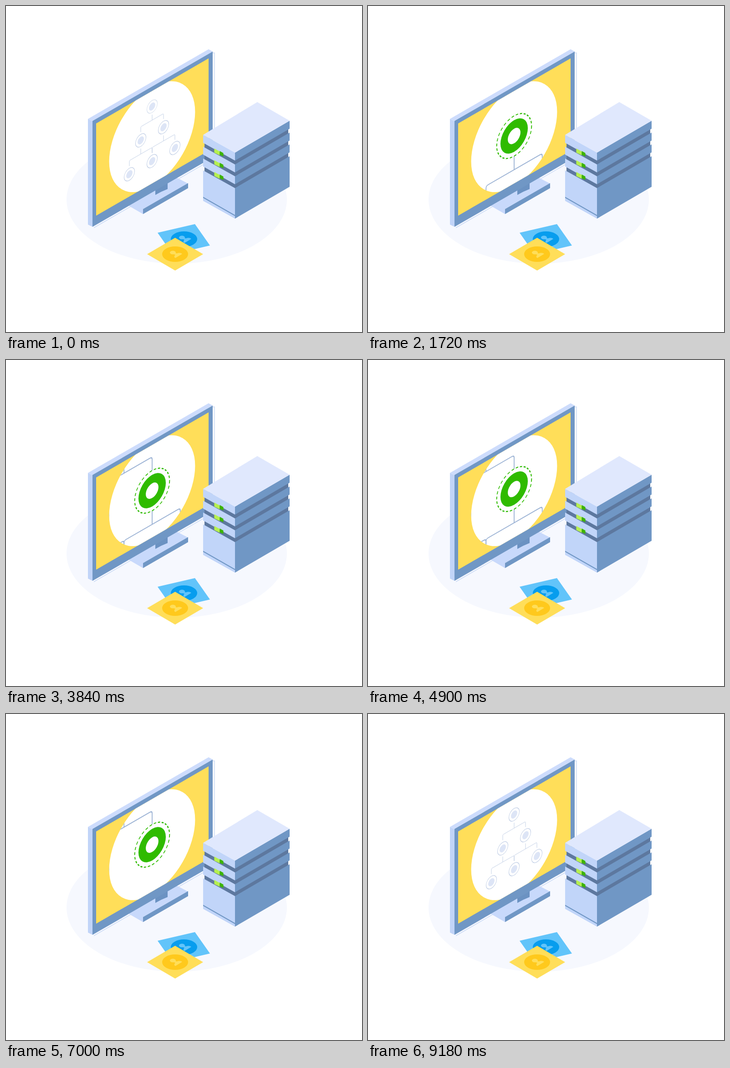
Recreate the animation shown at these times as an HTML page. Size 782 by 716 pixels, loop 9.2 s.

```html
<!DOCTYPE html>
<html lang="en">
<head>
<meta charset="utf-8">
<title>Network tree</title>
<style>
  html, body { margin: 0; width: 100%; height: 100%; overflow: hidden; background: #fff; }
  svg { display: block; width: 782px; height: 716px; }
</style>
</head>
<body>
<svg viewBox="0 0 782 716" xmlns="http://www.w3.org/2000/svg">
  <defs>
    <clipPath id="screen"><path d="M198 258L445 115V318L198 460.500Z"/></clipPath>
    <clipPath id="disc"><circle r="109"/></clipPath>
    <g id="person">
      <ellipse cx="-4.500" cy="-3.500" rx="6.500" ry="4"/>
      <path d="M1 8.500L16 -.5C13 -4 7 -3 4 -1.500L0 -3L-3 0L1 1.500C-2 4 -2 7 1 8.500Z"/>
    </g>
  </defs>

  <ellipse cx="375" cy="425" rx="242" ry="141" fill="#f6f8fe"/>

  <g id="monitor">
    <path d="M453 103H458V334L193 487" fill="none" stroke="#cddcf5" stroke-width="1.5"/>
    <path d="M270 428L375 377L400 390L301 446V457L270 439Z" fill="#c8d9fb"/>
    <path d="M301 446L400 389V400L301 457Z" fill="#7097c5"/>
    <path d="M328 400L355 385V402L341 408L328 415Z" fill="#6b92c2"/>
    <path d="M180 248L445 95L454 100L190 253Z" fill="#cddcfc"/>
    <path d="M180 248L190 253V485L180 480Z" fill="#c1d4f8"/>
    <path d="M190 252.500L454 100V332.500L190 485Z" fill="#7097c5"/>
    <path d="M198 258L445 115V318L198 460.500Z" fill="#ffde59"/>
    <g clip-path="url(#screen)">
      <g transform="matrix(.866 -.5 0 1 321 287)">
        <circle r="109" fill="#fff"/>
        <g clip-path="url(#disc)"><g id="tree"></g></g>
      </g>
    </g>
  </g>

  <g id="server"></g>

  <g id="cards">
    <path d="M333 498L415 479L448 526L366 545Z" fill="#62c4fa"/>
    <ellipse cx="391" cy="512" rx="29" ry="17" fill="#079dee"/>
    <use href="#person" x="391" y="512" fill="#62c4fa"/>
    <path d="M310 545L371.500 509L433 545L371.500 581Z" fill="#ffde59"/>
    <ellipse cx="371.500" cy="545" rx="28.500" ry="17" fill="#ffc91c"/>
    <use href="#person" x="371" y="545" fill="#ffde59"/>
  </g>
</svg>

<script>
const LOOP = 9200, STEP = 2396, MOVE_START = 20, MOVE_TIME = 1130;
const HALF = 28.87, ROW = 60, LINE_GAP = 18, ZOOM = 2.47, BEND = .8;
const PALE = [190, 204, 228], LINE = [155, 178, 212];
const DOT = [221, 229, 246], GREEN = [47, 187, 0];

const $ = id => document.getElementById(id);
const lerp = (a, b, p) => a + (b - a) * p;
const mix = (a, b, p) => `rgb(${a.map((c, i) => Math.round(lerp(c, b[i], p)))})`;
const ease = p => (1 - Math.cos(Math.PI * Math.min(1, Math.max(0, p)))) / 2;

function add(parent, tag, attrs) {
  const el = document.createElementNS('http://www.w3.org/2000/svg', tag);
  set(el, attrs);
  parent.append(el);
  return el;
}
function set(el, attrs) {
  for (const key in attrs) el.setAttribute(key, attrs[key]);
}

// Server: one slab per tier, with a recessed slot and a lamp between tiers
function buildServer() {
  const g = $('server');
  const shape = (d, fill) => add(g, 'path', { d, fill });
  const walls = (y, h, inset, left, right) => {
    const l = 433 + inset, r = 623 - inset;
    const yl = y + inset * .56, yr = y - 31 + inset * .58;
    shape(`M${l} ${yl}L503 ${y + 39}v${h}L${l} ${yl + h}Z`, left);
    shape(`M503 ${y + 39}L${r} ${yr}v${h}L503 ${y + 39 + h}Z`, right);
  };
  walls(298, 70, 3, '#5d789f', '#5d789f');
  for (let i = 0; i < 4; i++) walls(283 + 26 * i, i < 3 ? 17.5 : 67, 0, '#c1d5f9', '#7097c5');
  shape('M433 283L552 211L623 252L503 322Z', '#e0e8fd');
  shape('M433 419L503 459V461.500L433 421.500Z', '#7097c5');
  for (let i = 0; i < 3; i++) {
    const y = 313 + 25.7 * i;
    shape(`M457.500 ${y}l12 6.500v8.500l-12 -6Z`, '#b6f04f');
    shape(`M469.500 ${y + 5.5}l8 4.500v7.500l-8 -3.500Z`, '#3cb400');
  }
}

const tree = $('tree');
const links = add(tree, 'g', { fill: 'none', 'stroke-width': .85 });

function addLink(x, y) {
  const mid = y + ROW / 2, end = y + ROW - LINE_GAP, l = x - HALF, r = x + HALF, c = 2.2;
  add(links, 'path', {
    d: `M${x} ${y + LINE_GAP}V${mid}M${l} ${end}V${mid + c}Q${l} ${mid} ${l + c} ${mid}` +
       `H${r - c}Q${r} ${mid} ${r} ${mid + c}V${end}`
  });
}

function addNode(x, y) {
  const g = add(tree, 'g', { transform: `translate(${x} ${y})` });
  return {
    ring: add(g, 'circle', { fill: 'none', pathLength: 260 }),
    dot: add(g, 'circle', {}),
    hole: add(g, 'circle', { fill: '#fff' })
  };
}

const nodes = [];
for (let row = 0; row < 3; row++) {
  for (let i = row; i >= 0; i--) {
    const x = (2 * i - row) * HALF, y = (row - 1) * ROW;
    if (row < 2) addLink(x, y);
    nodes.push({ ...addNode(x, y), turn: i === row ? row : -1 });
  }
}

// Camera stops: overview, then the rightmost node of each row, then back
const STOPS = [
  { s: 1, x: 0, y: 6.3 },
  { s: ZOOM, x: 0, y: 1.5 - ZOOM * ROW },
  { s: ZOOM, x: ZOOM * HALF, y: 0 },
  { s: ZOOM, x: 2 * ZOOM * HALF, y: ZOOM * ROW },
  { s: 1, x: 0, y: 6.3 }
];

function camera(t) {
  const leg = Math.max(0, Math.min(3, Math.floor((t - MOVE_START) / STEP)));
  const p = ease((t - MOVE_START - leg * STEP) / MOVE_TIME);
  const a = STOPS[leg], b = STOPS[leg + 1];
  const bent = leg === 1 || leg === 2;
  const px = bent ? p * p : p;
  const py = bent ? p * (2 * (1 - p) * BEND + p) : p;
  return { s: lerp(a.s, b.s, p), x: lerp(a.x, b.x, px), y: lerp(a.y, b.y, py) };
}

function selection(turn, t) {
  if (turn < 0) return 0;
  const on = ease((t - 235 - STEP * turn) / 900);
  const off = ease((t - 340 - STEP * (turn + 1)) / 900);
  return on * (1 - off);
}

function render(t) {
  const cam = camera(t), zoom = (cam.s - 1) / (ZOOM - 1);
  tree.setAttribute('transform', `translate(${-cam.x} ${-cam.y}) scale(${cam.s})`);
  links.setAttribute('stroke', mix(PALE, LINE, zoom));
  const idle = PALE.map((c, i) => lerp(c, LINE[i], zoom));
  for (const { ring, dot, hole, turn } of nodes) {
    const p = selection(turn, t);
    const gap = 4.3 * Math.min(1, p * 2);
    const fade = turn === 0 && t < 1000 ? lerp(.65, 1, p) : 1;
    set(ring, {
      r: lerp(13.3, 17.9, p),
      stroke: mix(idle, GREEN, p),
      'stroke-width': lerp(1.1, .9, p),
      'stroke-dasharray': p > 0 ? `${10 - gap} ${gap}` : 'none',
      opacity: fade * (1 - p * (1 - p))
    });
    set(dot, { r: lerp(8, 14.05, p), fill: mix(DOT, GREEN, p) });
    set(hole, { r: 6.5 * p });
  }
}

buildServer();
const start = performance.now();
function tick() {
  render((performance.now() - start) % LOOP);
  requestAnimationFrame(tick);
}
render(0);
requestAnimationFrame(tick);
</script>
</body>
</html>
```
